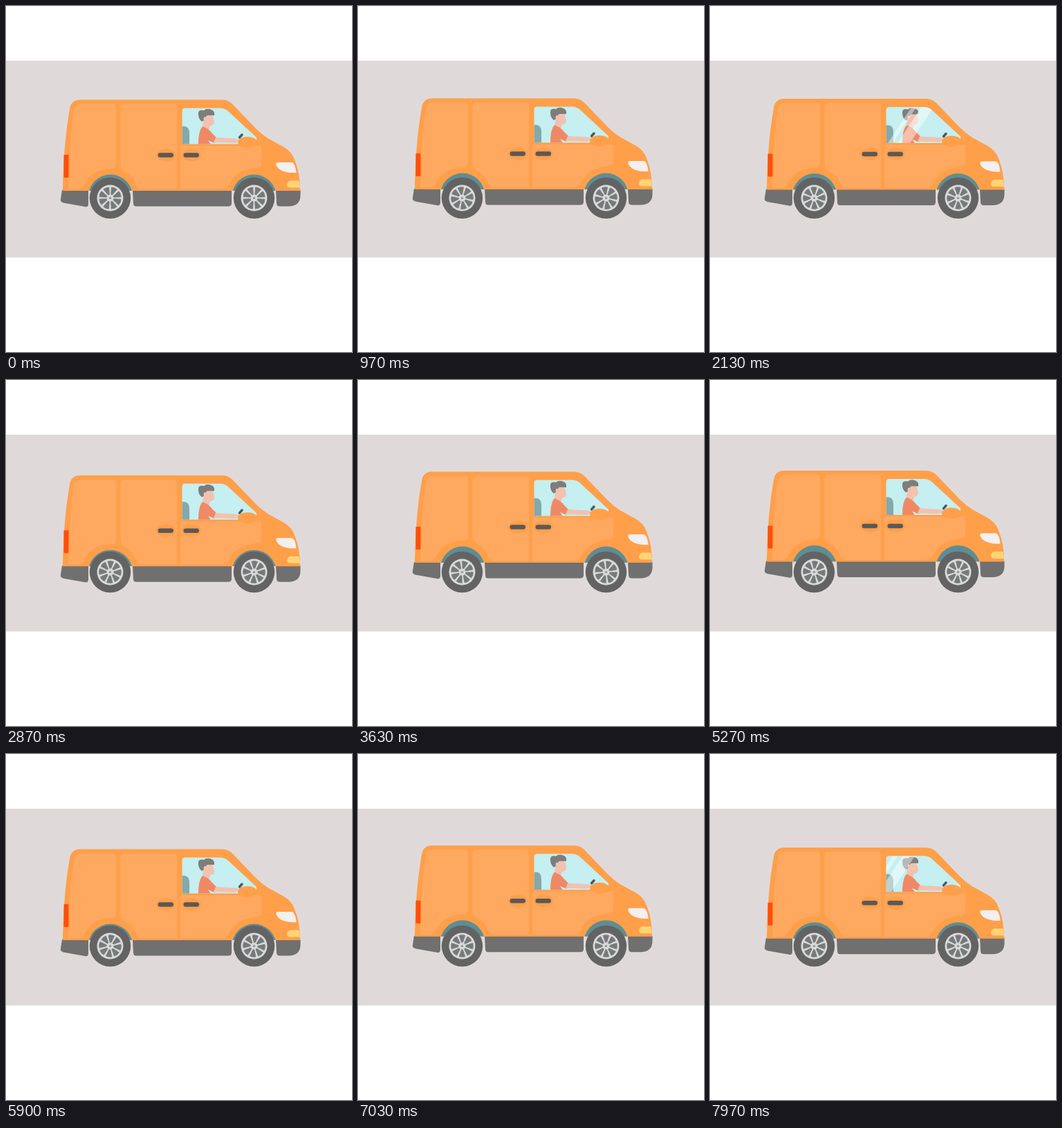
Animation, 500 px wide and 500 px high, one loop 8 s. Source, as an HTML page:

```html
<!DOCTYPE html>
<html lang="en">
<head>
<meta charset="utf-8">
<title>Van</title>
<style>
  html, body { margin: 0; width: 100%; height: 100%; overflow: hidden; background: #fff; }
  svg { display: block; width: 100vw; height: 100vh; }
</style>
</head>
<body>
<svg viewBox="0 0 500 500">
  <defs>
    <path id="pane" d="M259 147.5H309Q317 147.5 322 153L362 190V199.5H254.5V152Q254.5 147.5 259 147.5Z"/>
    <clipPath id="window"><use href="#pane"/></clipPath>
    <clipPath id="shell">
      <path id="shape" d="M107 135.5H312Q321 135.5 327 141.5L361 177Q370 186 379 191.5L400 203Q413 210 417 222Q425 241 425 267H82Q83 200 92 149Q94 135.5 107 135.5Z"/>
    </clipPath>
    <g id="wheel">
      <circle r="29.7" fill="#636363"/>
      <circle r="19" fill="#d9d9d9"/>
      <g class="spokes" fill="#777a7b"></g>
      <circle r="3.6" fill="#d9d9d9"/>
      <circle r="1.6" fill="#8b8d8e"/>
    </g>
  </defs>

  <rect y="79" width="500" height="284.5" fill="#dfdad9"/>

  <g id="body">
    <g fill="#707070">
      <path d="M81 266H119V286Q119 291 114 290L83 284.5Q78 283 79 279Z"/>
      <path d="M183 266H326V285Q326 289.5 321 289.5H188Q184 289.5 184 285Z"/>
      <path d="M390 266H425.5V274Q425 289.5 408 289.5H396Q391 289.5 391 285Z"/>
    </g>
    <use href="#shape" fill="#ff9f4a"/>
    <g fill="#ffa860">
      <path d="M108 141.5H154Q159 141.5 159 147V229Q159 235 153 235Q124 235 113 258Q110 264.500 104 264.500H90Q91 200 98 151Q99 141.500 108 141.500Z"/>
      <path d="M171 141.500H242Q247 141.500 247 147V264.500H196Q190 264.500 188 258Q183 245 171 239Q165.500 236 165.500 229V147Q165.500 141.500 171 141.500Z"/>
      <path d="M252 202H369V227Q369 234 360 234Q334 236 323 256Q319 264.500 312 264.500H252Z"/>
    </g>
    <g clip-path="url(#shell)" fill="#5f8d94">
      <circle cx="151" cy="275.500" r="32"/>
      <circle cx="358.500" cy="275.500" r="32"/>
    </g>
    <rect x="83.500" y="215" width="7" height="33" rx="1" fill="#ff4f08"/>
    <path d="M393 226H413Q418 227 419.500 241Q402 242 394 235Q387 227 393 226Z" fill="#f3f0ef"/>
    <path d="M411 252.500H423.500L425 262.500H410Q406 262 406 258Q407 253 411 252.500Z" fill="#ffd476"/>

    <g fill="#ff9f4a">
      <ellipse cx="231" cy="215.500" rx="14" ry="9"/>
      <ellipse cx="268" cy="215.500" rx="14" ry="9"/>
    </g>
    <g fill="#595959">
      <rect x="219.500" y="212.300" width="22.500" height="6.400" rx="3.200"/>
      <rect x="256.500" y="212.300" width="22.500" height="6.400" rx="3.200"/>
    </g>

    <use href="#pane" fill="#c5eff0"/>
    <g clip-path="url(#window)">
      <path d="M254 174Q265 172 265 184V200H254Z" fill="#87a8a9"/>
      <path d="M286 156H298L301 167Q301 173 295 173L293 180L284 177Z" fill="#f1c2b0"/>
      <path d="M278 157Q277 149 286 151Q290 147 297 150Q302 152 301 158H291Q289 158 288 164L283 167Q278 163 278 157Z" fill="#7d7d7d"/>
      <ellipse cx="287.500" cy="163" rx="2" ry="3" fill="#f1c2b0"/>
      <path d="M284 174Q293 177 298 184L306 192L301 198L292 194L296 200H278Q278 180 284 174Z" fill="#ef8965"/>
      <path d="M303 190L332 191.500Q337 192 336 196L331 198L300 197Z" fill="#f1c2b0"/>
      <path d="M337.500 190L341 186" stroke="#4f5b5d" stroke-width="3.500" stroke-linecap="round"/>
      <g id="glare" fill="#fff" fill-opacity=".45">
        <path d="M0 146H18L-18 201H-36Z"/>
        <path d="M-14 146H-7L-43 201H-50Z"/>
      </g>
    </g>
    <path d="M249.500 143V264.500" stroke="#ff9f4a" stroke-width="4.500"/>
    <ellipse cx="349" cy="197" rx="14" ry="8" fill="#ff9f4a"/>
  </g>

  <g transform="translate(150.500 277.500)"><use href="#wheel"/></g>
  <g transform="translate(358.500 277.500)"><use href="#wheel"/></g>
</svg>
<script>
  const LOOP = 8000, BOUNCE = 3333.33, SWEEP = 6000, TURN = 833.33;
  // Suspension travel: [ms, px]
  const bumps = [[0, 0], [300, -3], [450, -3.2], [970, -2], [1300, -.2], [1560, .2],
                 [1880, -4.8], [2130, -1.5], [2567, 2], [2760, 2.3]];

  const body = document.getElementById('body');
  const glare = document.getElementById('glare');
  const spokes = document.querySelector('.spokes');

  for (let i = 0; i < 8; i++) {
    const wedge = document.createElementNS('http://www.w3.org/2000/svg', 'path');
    wedge.setAttribute('d', 'M-1.200 -5L-4.700 -15.200Q0 -17.400 4.700 -15.200L1.200 -5Z');
    wedge.setAttribute('transform', `rotate(${22.5 + i * 45})`);
    spokes.append(wedge);
  }

  function bump(i) {
    const n = bumps.length, lap = Math.floor(i / n);
    const [time, y] = bumps[i - lap * n];
    return [time + lap * BOUNCE, y];
  }

  function slope(i) {
    const [t0, y0] = bump(i - 1), [t1, y1] = bump(i), [t2, y2] = bump(i + 1);
    return (y1 - y0) * (y2 - y1) <= 0 ? 0 : (y2 - y0) / (t2 - t0);
  }

  function travel(time) {
    const t = time % BOUNCE;
    let i = 0;
    while (bump(i + 1)[0] <= t) i++;
    const [t0, y0] = bump(i), [t1, y1] = bump(i + 1);
    const d = t1 - t0, u = (t - t0) / d, v = 1 - u;
    return v * v * ((1 + 2 * u) * y0 + u * d * slope(i))
         + u * u * ((1 + 2 * v) * y1 - v * d * slope(i + 1));
  }

  function draw(now) {
    const t = now % LOOP;
    body.setAttribute('transform', `translate(0 ${travel(t).toFixed(2)})`);
    spokes.setAttribute('transform', `rotate(${t % TURN / TURN * 360})`);
    glare.setAttribute('transform', `translate(${306 + (t % SWEEP - 2130) * .169} 0)`);
    requestAnimationFrame(draw);
  }

  const start = performance.now();
  draw(0);
  function tick(now) {
    draw(Math.max(0, now - start));
  }
</script>
</body>
</html>
```
